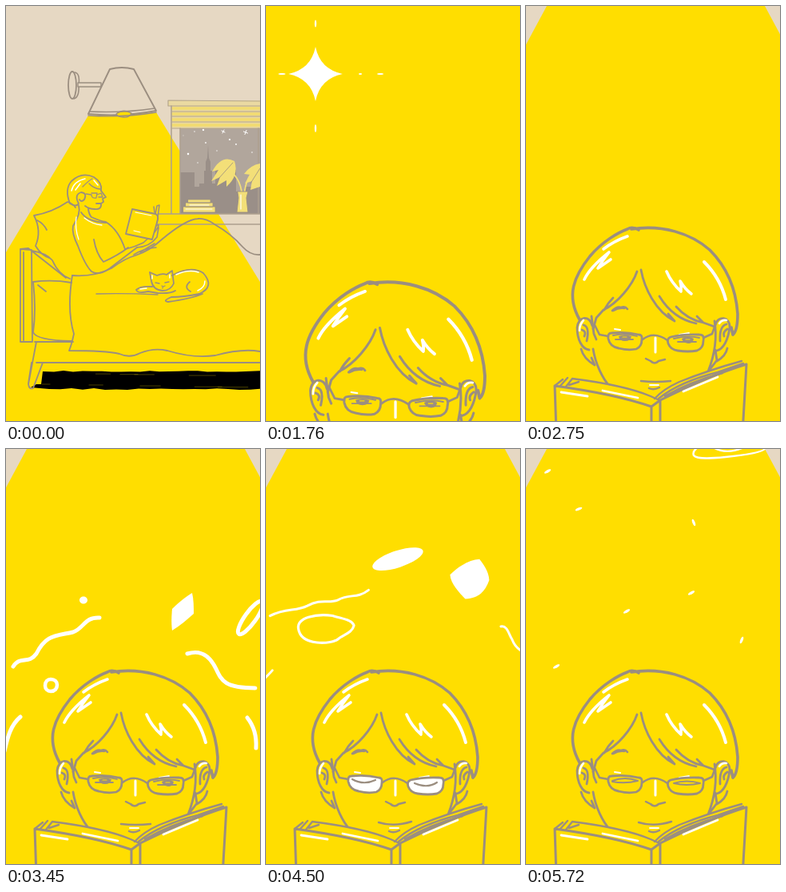
Recreate the animation shown at these times as an HTML page with a canvas. Size 318x519 px, loop 5810 ms.

```html
<!DOCTYPE html>
<html lang="en">
<head>
<meta charset="utf-8">
<title>Bedtime reading</title>
<style>
html, body { margin: 0; width: 100%; height: 100%; overflow: hidden; background: #ffde00; }
canvas { display: block; width: 318px; height: 519px; }
</style>
</head>
<body>
<canvas id="stage" width="318" height="519"></canvas>
<script>
const g = document.getElementById('stage').getContext('2d');
const LOOP = 5810, STEP = LOOP / 66;
const YELLOW = '#ffde00', BEIGE = '#e6d8c3', GREY = '#9b8e80', WHITE = '#fff',
      PANE = '#b1a69c', TOWN = '#9a8f88', PALE = '#f3df78';
const NUM = /-?\d*\.?\d+/g;

const clamp = v => Math.max(0, Math.min(1, v));
const lerp = (a, b, p) => a + (b - a) * p;
const rand = n => { const s = Math.sin(n * 127.1) * 43758.5; return s - Math.floor(s); };
const line = (d, w = 1.8, c = GREY) => { g.strokeStyle = c; g.lineWidth = w; g.stroke(new Path2D(d)); };
const fill = (d, c) => { g.fillStyle = c; g.fill(new Path2D(d)); };
const both = (d, c, w) => { fill(d, c); line(d, w); };

// Path helpers: transform every point, or blend two paths of equal structure
function mapPath(d, fx, fy) {
  let i = 0;
  return d.replace(NUM, v => (i++ % 2 ? fy(+v) : fx(+v)).toFixed(2));
}
const shift = (d, dx, dy) => mapPath(d, x => x + dx, y => y + dy);
function mix(a, b, p) {
  const n = b.match(NUM);
  let i = 0;
  return a.replace(NUM, v => lerp(+v, +n[i++], p).toFixed(2));
}
function oval(x, y, rx, ry, rot = 0) {
  const c = Math.cos(rot), s = Math.sin(rot), k = 0.55;
  const pt = (u, v) => `${(x + u * rx * c - v * ry * s).toFixed(2)},${(y + u * rx * s + v * ry * c).toFixed(2)} `;
  return 'M' + pt(-1, 0) + 'C' + pt(-1, -k) + pt(-k, -1) + pt(0, -1) + 'C' + pt(k, -1) + pt(1, -k) + pt(1, 0) +
    'C' + pt(1, k) + pt(k, 1) + pt(0, 1) + 'C' + pt(-k, 1) + pt(-1, k) + pt(-1, 0) + 'Z';
}

/* ---------- bedroom ---------- */

const STARS = [[222, 162], [236, 157], [247, 155], [280, 167], [228, 185], [250, 171], [288, 173], [308, 183], [264, 181], [240, 196]];

function drawWindow(n) {
  fill('M218,152H318V260H218Z', PANE);
  fill('M218,208H236V226H242V222H248V206H250V195L252,190L253,174L254,190L256,195V206H258V222H262V205H288V232H300V226H318V260H218Z', TOWN);
  STARS.forEach(([x, y], i) => {
    const r = 0.5 + 0.8 * rand(i + Math.floor(n / 2) * 7);
    fill(oval(x, y, r, r), WHITE);
  });
  [[272, 157], [300, 158]].forEach(([x, y], i) => {
    const r = 2 + rand(n + i * 5) * 1.2;
    line(`M${x - r},${y - 1}L${x + r},${y + 1}M${x + 1},${y - r}L${x - 1},${y + r}`, 1, WHITE);
  });
  fill('M203,118H318V153H207V125H203Z', '#ead9a1');
  for (const y of [128, 135, 142, 149]) line(`M208,${y}H318`, 3.4, '#f2dc70');
  line('M318,119L203,118V125H318M208,132H318M208,138H318M208,145H318M208,153H318', 1.2, '#b5a68c');
  line('M207,125V260M218,153V260M316,153V260M190,260H318M188,260V272M190,273H318', 1.5, '#ada08e');
  // books on the sill
  both('M222,251H262V258H222ZM225,246H259V251H225ZM228,242H256V246H228Z', PALE, 0.8);
  line('M225,254H258M230,249H254', 1, WHITE);
  // plant
  line('M278,205Q296,215 296,245M312,205Q298,215 298,245', 1.8, PALE);
  fill('M286,194Q270,185 258,207L266,205L257,219L268,214L264,225L276,218L276,226Q292,212 286,194Z', PALE);
  fill('M318,197Q306,199 298,210L306,211L299,222L308,219L306,230L318,226Z', PALE);
  line('M284,196L266,216M318,203L306,222', 0.8);
  both('M290,232H303L301,240L303,258H289L291,240Z', PALE, 0.9);
  line('M294,236V254', 1.2, WHITE);
}

function drawLamp() {
  both(oval(83, 99, 5, 17), BEIGE, 1.8);
  line('M86,83Q93,84 91,99Q92,114 85,116', 1.6);
  both('M90,96H119V101H90Z', BEIGE, 1.4);
  both('M130,79Q145,75 160,79L188,131Q146,139 103,135Z', BEIGE, 1.9);
  fill('M138,134Q147,128 157,134Q156,139 148,139Q139,139 138,134Z', YELLOW);
  line('M138,135Q147,128 157,134Q154,140 147,139Q140,139 138,135', 1.3);
  line('M105,132Q146,134 186,128M103,137Q146,140 188,133', 1.4);
}

function drawBed(n) {
  let d = 'M46,457';
  for (let x = 60; x < 330; x += 12) d += `L${x},${(456 + rand(x + n) * 1.8).toFixed(1)}`;
  for (let x = 320; x > 40; x -= 14) d += `L${x},${(478 + rand(x * 3 + n) * 2.2).toFixed(1)}`;
  fill(d + 'L31,477L38,473L44,473Z', '#000');
  for (let i = 0; i < 9; i++) {
    const x = 45 + rand(i + n * 3) * 240, y = i % 2 ? 459 + rand(i) * 4 : 473 + rand(i) * 4;
    line(`M${x},${y}h${10 + rand(i + n) * 30}`, 0.4, '#b79f00');
  }
  line('M18,304L32,305L33,420L18,420ZM22,308L22,418M18,304L28,303L75,340');
  line('M35,262Q58,258 77,245Q84,247 87,252M35,262Q45,281 37,300Q44,312 56,316M39,268Q47,272 51,280M32,306Q50,309 58,318Q66,336 80,341');
  line('M82,346Q58,342 34,345Q38,380 34,408Q38,418 82,419M40,349L50,357');
  line('M38,420L28,473Q29,480 34,478L46,446M38,446H318M32,446L28,472M36,420H84');
  line('M83,337Q76,380 85,410Q82,424 79,431Q125,431 142,435Q155,441 168,434Q185,427 202,431Q235,441 262,437Q295,428 318,432');
  line('M83,337Q110,339 132,328Q150,315 162,312Q180,306 195,292Q225,267 240,266Q250,265 261,273Q282,285 296,301Q306,312 318,311');
  line('M113,360Q150,359 190,361', 1.4);
}

function drawReader(n) {
  // hair and face
  line('M80,247Q73,229 82,219Q95,207 110,214Q121,221 119,231M80,247Q88,252 91,247Q85,236 94,233Q102,234 98,242Q94,246 92,242');
  line('M119,231L125,239L121,241L122,245L119,247Q120,255 111,254Q104,254 99,250M113,247H119');
  line('M100,235L107,236Q107,241 113,240L114,234H107M114,236L119,234L121,239H116', 1.3);
  line('M104,222Q109,228 118,229M96,226Q104,218 108,216', 1.3);
  line('M82,231Q85,219 99,216M87,230L93,222M110,218L115,224', 1.6, WHITE);
  // body
  line('M91,249Q94,260 84,275Q82,284 90,300Q99,324 107,332Q116,338 130,328L164,302');
  line('M103,254Q104,261 107,264Q118,269 125,270Q141,280 149,304M94,258Q102,270 125,271M110,292Q113,310 122,320Q140,312 153,302');
  line('M88,264Q86,278 91,292M98,265Q108,273 120,274', 1.3, WHITE);
  line('M150,304Q162,301 172,296L186,283Q194,272 189,274L181,283M164,302Q180,301 189,289L191,277M160,311Q172,303 188,302M168,308L186,297', 1.6);
  // book, with a page lifting now and then
  const lift = Math.max(0, Math.sin((n - 5) * 0.55)) * 3;
  both('M158,254L187,260Q191,262 190,267L183,292L150,285Z', YELLOW, 1.8);
  line(`M187,260L${189 - lift},250L192,249L189,272M186,258L185,251`, 1.5);
  line('M162,258L182,262M160,281L168,283', 1.2, WHITE);
}

function drawCat(n) {
  const b = Math.sin(n * 0.45) * 0.7;
  line(`M208,337Q232,${324 - b} 247,334Q262,351 242,360Q222,364 207,364Q195,369 203,370Q232,366 246,360`);
  line('M182,344L180,333L189,337Q196,334 201,336L208,331L210,347Q206,356 196,356Q184,355 182,344M183,351Q168,350 163,355Q165,360 178,357L190,359Q206,360 212,356M231,357Q222,352 230,345');
  line('M187,346l5,1M199,346l5,-1M195,350l2,1l2,-1M196,352v1', 1.3);
  line('M213,336Q228,329 241,333M183,337v4M205,336v4M168,354l8,-1M240,356Q249,352 249,344', 1.5, WHITE);
}

function drawRoom(n) {
  g.fillStyle = BEIGE;
  g.fillRect(0, 0, 318, 519);
  fill('M103,137L0,308V519H318V345L188,133Z', YELLOW);
  drawWindow(n);
  drawLamp();
  drawBed(n);
  drawReader(n);
  drawCat(n);
}

/* ---------- close-up ---------- */

const LENS_L = 'M107,409Q102,409 103,416Q105,426 116,428Q128,431 138,429Q145,426 145,417Q146,411 141,411Q125,407 107,409Z';
const LENS_R = 'M181,414Q176,416 178,422Q181,430 190,431Q203,433 214,431Q222,428 222,419Q224,411 217,411Q198,410 181,414Z';

function drawFace(t) {
  const W = 3.6;
  fill('M64,402C52,366 60,340 80,313C97,291 120,282 136,278C180,275 225,294 250,330C264,352 268,384 258,410L240,435L228,458L165,500L106,477L84,440Z', YELLOW);
  line('M67,392C50,362 60,338 80,313C96,294 116,283 127,279Q133,275 141,280M132,279C170,273 206,284 230,305C254,329 263,356 265,385Q265,406 259,411L257,402', W);
  line('M139,332C133,350 114,372 97,380L88,390L84,404M109,365Q102,372 98,380M144,330C148,352 162,382 186,394L178,385M167,363C178,381 194,393 213,397M188,376Q202,392 222,396L214,388M222,396L236,401', 2.8);
  line('M83,400C80,386 65,388 64,402C64,417 70,429 79,430M82,388L85,410L88,417M72,399Q80,401 76,419M70,405Q76,407 73,413M69,429Q72,441 86,449L82,440M84,429C87,448 96,466 105,476', 2.8);
  line('M237,399C240,386 256,389 255,402C253,418 247,429 239,431M236,394Q241,424 228,457M251,398Q242,400 243,419M252,404Q246,408 248,413M252,428Q250,438 239,444M237,430L239,443L229,456', 2.8);
  line('M72,393Q67,398 67,406M251,393Q245,392 242,397', 2.6, WHITE);
  line('M108,381Q114,375 119,377Q124,375 127,379M109,381Q116,377 123,378', 2.6);

  const shine = t > 3940 && t < 4500, shut = t > 5200, smile = t > 3900;
  line('M111,404L118,405M192,411L204,409', 2, WHITE);
  if (shine) { fill(LENS_L, WHITE); fill(LENS_R, WHITE); }
  line(LENS_L, 2.8);
  line(LENS_R, 2.8);
  line('M146,417Q160,406 177,418M103,413L92,411L86,399M222,415L233,410L238,396', 2.6);
  if (shine) line('M108,413Q122,421 137,414M186,418Q202,425 214,417', 2.2);
  else if (shut) line('M108,415Q124,409 140,415M108,416Q124,419 140,415M185,418Q201,413 218,418M185,418Q201,422 218,418', 2);
  else {
    line('M109,412Q124,409 139,413M185,416Q202,412 217,415M112,417H134M190,420H213', 1.8);
    fill('M116,413Q124,410 132,413Q131,419 124,419Q117,419 116,413ZM195,416Q203,412 210,416Q209,422 203,422Q196,421 195,416Z', GREY);
    line('M121,414H126M200,417H205', 1.2, YELLOW);
  }
  line('M162,415V433', 3, WHITE);
  line('M150,441L156,444Q161,449 166,444L174,442', 2.5);
  line(smile ? 'M141,467Q160,473 182,466' : 'M144,469Q162,471 181,469', 2.5);
  line('M154,478Q160,481 167,477', 2.4);
  line('M155,474H166', 1.8, WHITE);

  line('M97,304Q110,294 127,288M73,342Q80,327 104,308Q96,318 90,328L106,317', 3.6, WHITE);
  line('M176,332Q182,346 194,357Q195,350 193,344Q199,354 207,360', 3.6, WHITE);
  line('M223,320Q243,340 250,367', 4, WHITE);

  // book
  fill('M36,475L58,465Q120,475 160,492Q180,470 270,445L276,449L272,535H38Z', YELLOW);
  line('M38,535L36,475C80,481 125,490 157,501V535M157,501L168,493V535M168,493C200,477 240,459 276,448L271,535', 3);
  line('M36,475L46,467M43,475L52,465M50,476L58,466M58,466C90,470 130,477 156,488L167,493M54,474L66,470', 2.4);
  line('M161,491Q172,479 192,470Q230,455 270,444M166,491Q192,470 240,458L272,447M174,488Q205,470 246,459', 2.4);
  line('M44,483L77,488M96,481L140,490M197,482L240,464', 2.8, WHITE);

  // a page turning from right to left
  const p = (t - 1900) / 400;
  if (p > 0 && p < 1) {
    const x = lerp(250, 42, p), y = 474 - 30 * Math.sin(Math.PI * p);
    line(`M${x},${y + 20}V${y}Q${lerp(x, 162, 0.55)},${y + 8} 162,491`, 2.4);
  }
}

// Each shape: filled?, line widths, then poses; a pose [dx, dy] moves the one before it
const TIMES = [2740, 3433, 4137, 4930, 5722];
const SHAPES = [
  [0, [5, 3, 3, 3],
    'M9,272C18,258 28,270 38,256C50,232 62,234 84,229C98,224 98,210 117,211',
    'M17,254C30,243 34,256 45,245C58,230 60,245 70,236C82,222 84,236 100,215',
    'M-10,152C20,142 40,138 60,135C85,132 100,130 115,130C135,128 150,128 164,128', [120, -190]],
  [1, [1, 1, 1, 1], oval(97, 189, 5, 4.5), oval(125, 167, 22, 5.5, -0.52), oval(215, 101, 48, 17, -0.2), [90, -160]],
  [1, [1, 1, 1, 1],
    'M208,200C216,192 226,184 233,180C235,188 235,198 235,206C226,214 218,221 208,227C207,220 207,210 208,200Z',
    'M218,187C224,179 234,176 241,175C242,184 242,194 239,203C232,210 226,217 217,219C216,208 216,196 218,187Z',
    'M246,120C256,112 275,92 300,91C310,94 325,102 330,115C328,135 320,148 290,148C275,145 250,134 246,120Z', [100, -180]],
  [0, [5, 3.4, 3, 3], oval(306, 211, 25, 7, -0.95), oval(314, 197, 19, 8, -0.8), [70, -60], [0, -80]],
  [0, [4.5, 3.2, 3, 2.4],
    'M49,296C49,291 52,288 56,288C61,288 64,291 64,295C64,300 61,303 56,303C52,303 49,300 49,296Z',
    'M48,258C46,252 56,250 62,256C68,264 76,260 83,266C84,272 74,277 64,276C56,274 50,268 48,258Z',
    'M31,182C30,160 70,150 110,149C135,149 148,156 144,164C138,178 125,176 123,190C118,206 35,222 31,182Z',
    'M210,8C205,-4 240,-14 270,-12C290,-12 300,-8 300,-2C300,4 270,8 250,10C230,12 214,13 210,8Z'],
  [0, [5, 3, 3, 3],
    'M227,256C240,252 253,254 263,275C270,290 274,299 312,299',
    'M254,262C262,260 264,272 268,278C274,294 292,304 325,292', [90, -90], [0, -60]],
  [0, [5, 3, 3, 3], 'M-2,378C2,360 6,345 18,335', 'M-4,345C-1,338 3,332 8,324', 'M-8,226C-3,222 3,221 8,218', [-20, -60]],
  [0, [5, 3, 3, 3], 'M302,336C310,346 314,358 313,374', [30, -40], [0, -40], [0, -40]],
  [0, [3, 3, 3, 3], oval(-20, 250, 7, 14, 0.1), oval(9, 212, 7, 14, 0.1), [-40, -80], [0, -60]]
].map(([solid, widths, ...poses]) => {
  for (let i = 1; i < poses.length; i++)
    if (Array.isArray(poses[i])) poses[i] = shift(poses[i - 1], ...poses[i]);
  poses.unshift(mapPath(poses[0], x => lerp(165, x, 0.75), y => lerp(300, y, 0.5)));
  return { solid, widths: [2, ...widths], poses };
});

const FLECKS = [[27, 28, -0.5], [66, 75, -0.4], [210, 92, 1.2], [207, 180, -0.5], [126, 203, -0.5], [38, 272, -0.5], [270, 239, -1.2]];

function drawShapes(t) {
  if (t < TIMES[0]) return;
  let i = 0;
  while (i < 3 && t >= TIMES[i + 1]) i++;
  let p = clamp((t - TIMES[i]) / (TIMES[i + 1] - TIMES[i]));
  if (!i) p = 1 - (1 - p) ** 2;
  for (const s of SHAPES) {
    const d = mix(s.poses[i], s.poses[i + 1], p);
    if (s.solid) fill(d, WHITE);
    else line(d, lerp(s.widths[i], s.widths[i + 1], p), WHITE);
  }
  const k = clamp((t - 5150) / 400);
  if (k) for (const [x, y, a] of FLECKS) fill(oval(x, y + (5722 - t) * 0.06, 4.6 * k, 1.7 * k, a), WHITE);
  if (t > 5600) line('M236,-1Q252,7 273,-2', 2.2, WHITE);
}

function drawSparkle(t) {
  const p = (t - 1320) / 440, out = clamp((1940 - t) / 180);
  if (p < 0 || !out) return;
  const r = 34 * Math.min(1, p) * out, x = 62, y = 85;
  fill(`M${x},${y - r}Q${x + r * 0.17},${y - r * 0.17} ${x + r},${y}Q${x + r * 0.17},${y + r * 0.17} ${x},${y + r}Q${x - r * 0.17},${y + r * 0.17} ${x - r},${y}Q${x - r * 0.17},${y - r * 0.17} ${x},${y - r}Z`, WHITE);
  const rays = [[0, -63, 1.2, 4.5], [0, 68, 1.2, 5], [-42, 0, 4.5, 1], [56, 0, 2, 1], [81, 0, 4, 1]];
  for (const [dx, dy, rx, ry] of rays) fill(oval(x + dx * p, y + dy * p, rx * out, ry * out), WHITE);
}

function drawCloseUp(t) {
  const drop = 68 * Math.max(0, (2640 - t) / 880) ** 3;
  const half = 136 + drop * 0.88;
  g.fillStyle = BEIGE;
  g.fillRect(0, 0, 318, 519);
  fill(`M${162 - half},0H${163 + half}L${163 + half + 280},519H${162 - half - 280}Z`, YELLOW);
  drawSparkle(t);
  drawShapes(t);
  const s = 1 + drop * 0.00128;
  g.save();
  g.translate(161, 276 + drop);
  g.scale(s, s);
  g.translate(-161, -276);
  drawFace(t);
  g.restore();
}

function frame() {
  const n = Math.floor((performance.now() % LOOP) / STEP + 0.1), t = n % 66 * STEP;
  g.lineCap = g.lineJoin = 'round';
  if (t < 1310) drawRoom(n % 66);
  else drawCloseUp(t);
  requestAnimationFrame(frame);
}
frame();
</script>
</body>
</html>
```
